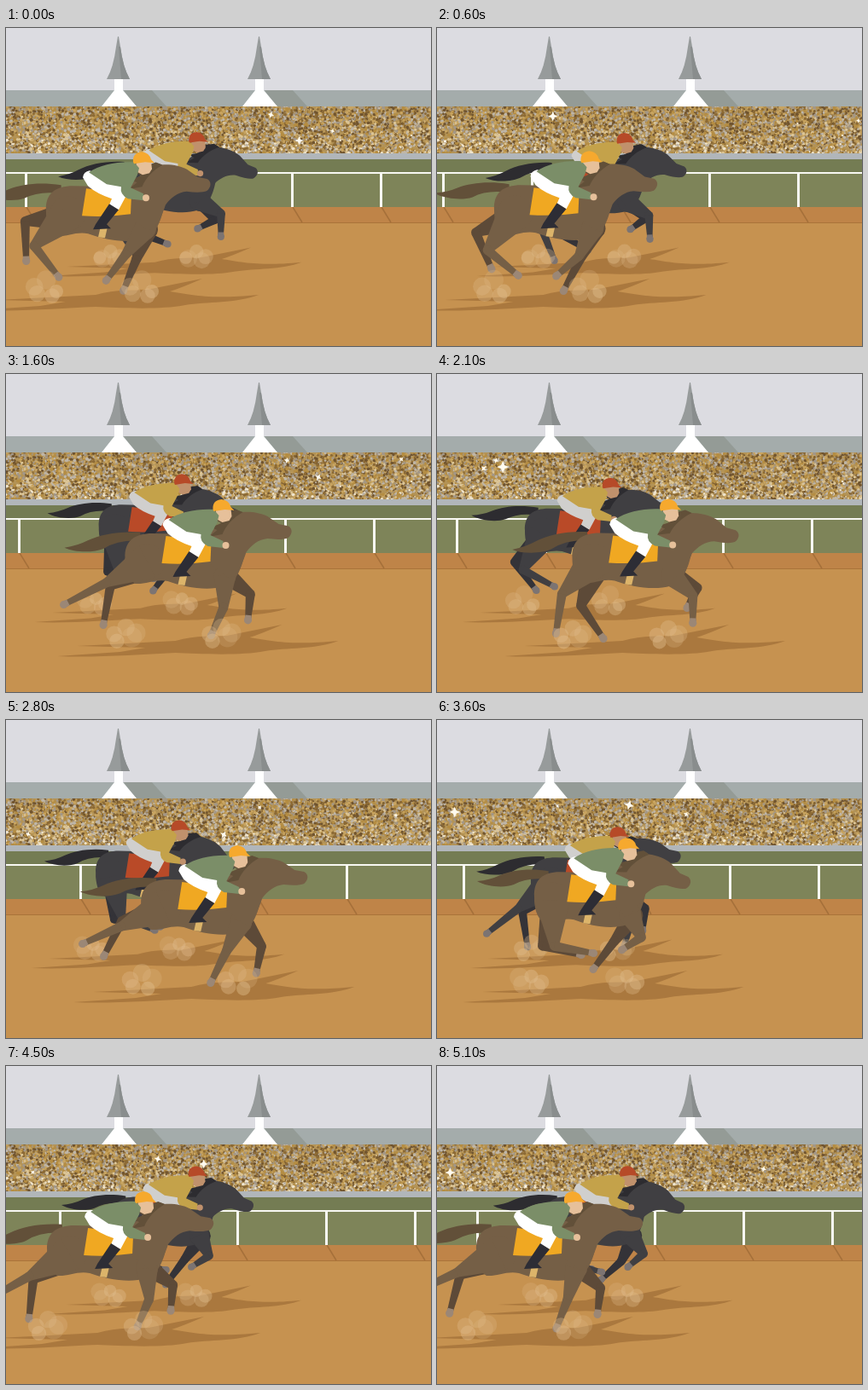
Recreate the animation shown at these times as an HTML page with a canvas. Size 498 px wide and 373 px high, loop 5200 ms.

```html
<!DOCTYPE html>
<html lang="en">
<head>
<meta charset="utf-8">
<title>Horse race</title>
<style>
html, body { margin: 0; width: 100%; height: 100%; overflow: hidden; background: #c69250; }
canvas { display: block; width: 498px; height: 373px; }
</style>
</head>
<body>
<canvas id="stage" width="498" height="373"></canvas>
<script>
const W = 498, H = 373, LOOP = 5200, STRIDES = 9;
const ctx = document.getElementById('stage').getContext('2d');

function seeded(s) {
  return () => {
    s = (s + 0x6D2B79F5) | 0;
    let r = Math.imul(s ^ (s >>> 15), 1 | s);
    r = (r + Math.imul(r ^ (r >>> 7), 61 | r)) ^ r;
    return ((r ^ (r >>> 14)) >>> 0) / 4294967296;
  };
}

function rect(c, color, x, y, w, h) {
  c.fillStyle = color;
  c.fillRect(x, y, w, h);
}

function shape(c, color, d) {
  c.fillStyle = color;
  c.fill(new Path2D(d));
}

function disc(c, color, x, y, r) {
  c.fillStyle = color;
  c.beginPath();
  c.arc(x, y, r, 0, 7);
  c.fill();
}

function placed(x, y, paint, c = ctx) {
  c.save();
  c.translate(x, y);
  paint();
  c.restore();
}

// Static scenery, painted once
function paintScenery() {
  const cv = document.createElement('canvas');
  cv.width = W;
  cv.height = H;
  const c = cv.getContext('2d');
  rect(c, '#dcdce1', 0, 0, W, 73);
  rect(c, '#a4acab', 0, 73, W, 19);
  for (const x of [132, 297]) placed(x, 0, () => {
    shape(c, '#949b96', 'M6 73H39L56 92H20Z');
    shape(c, '#fff', 'M-5 59H5V73L21 92H-20L-5 73Z');
    shape(c, '#979b9b', 'M-1 10H0L2 22Q5 46 13 60H-14Q-6 46 -3 22Z');
    shape(c, '#898d8d', 'M0 22H2Q5 46 13 60H3Z');
  }, c);
  crowd(c);
  rect(c, '#b1b6ba', 0, 147, W, 7);
  rect(c, '#747c53', 0, 154, W, 16);
  rect(c, '#7e8459', 0, 170, W, 40);
  rect(c, '#bf8448', 0, 210, W, 18);
  rect(c, '#aa7339', 0, 228, W, 1);
  rect(c, '#c69250', 0, 229, W, H);
  return cv;
}

function crowd(c) {
  const rnd = seeded(11);
  const tones = ['#70542f', '#8c6a35', '#b58d42', '#a39787', '#c9a561', '#bfb6a8', '#dcc596', '#efe4cc'];
  c.save();
  c.beginPath();
  c.rect(0, 92, W, 55);
  c.clip();
  rect(c, '#b39357', 0, 92, W, 55);
  for (let i = 0; i < 7000; i++) {
    const depth = rnd();
    const tone = tones[Math.floor(rnd() * (5.5 + depth * 2.5))];
    disc(c, tone, rnd() * W, 92 + depth * 55, 1 + rnd() * 0.9);
  }
  c.restore();
}

function fence(t) {
  ctx.strokeStyle = '#a5703a';
  ctx.lineWidth = 1.5;
  for (let x = 24 - t * 0.2 % 104; x < W; x += 104) {
    ctx.beginPath();
    ctx.moveTo(x, 210);
    ctx.lineTo(x + 11, 228);
    ctx.stroke();
    rect(ctx, '#f8f8f2', x - 2, 170, 3, 40);
  }
  rect(ctx, '#f8f8f2', 0, 169, W, 2);
}

// Camera flashes spread evenly over the loop
function sparkle(t) {
  const rnd = seeded(5), count = 70;
  for (let i = 0; i < count; i++) {
    const x = rnd() * W, y = 98 + rnd() * 44, size = 4 + rnd() * 4;
    const gap = Math.abs((t - i * LOOP / count + LOOP * 1.5) % LOOP - LOOP / 2);
    if (gap > 150) continue;
    const r = size * (1 - gap / 200), q = r * 0.3;
    placed(x, y, () => {
      ctx.rotate(i % 4 * 0.25);
      shape(ctx, '#fffbf0', `M0 ${-r}L${q} ${-q} ${r} 0 ${q} ${q} 0 ${r} ${-q} ${q} ${-r} 0 ${-q} ${-q}Z`);
    });
  }
}

// Hoof paths: evenly timed points of one stride
const hindPath = [[60, 290], [105, 272], [124, 282], [72, 308], [2, 292], [-23, 261]];
const forePath = [[119, 294], [145, 271], [172, 269], [192, 279], [178, 296], [131, 306]];

// Closed Catmull-Rom curve
function along(path, f) {
  const n = path.length, s = (f + 1) % 1 * n, i = Math.floor(s), u = s - i;
  return [0, 1].map(k => {
    const [a, b, c, d] = [-1, 0, 1, 2].map(j => path[(i + j + n) % n][k]);
    return b + u * (c - a + u * (2 * a - 5 * b + 4 * c - d + u * (3 * (b - c) + d - a))) / 2;
  });
}

function taper(color, ax, ay, wa, bx, by, wb) {
  const len = Math.hypot(bx - ax, by - ay) || 1;
  const nx = (ay - by) / len / 2, ny = (bx - ax) / len / 2;
  shape(ctx, color, `M${ax + nx * wa} ${ay + ny * wa}L${bx + nx * wb} ${by + ny * wb} ${bx - nx * wb} ${by - ny * wb} ${ax - nx * wa} ${ay - ny * wa}Z`);
  disc(ctx, color, bx, by, wb / 2);
}

// Two bones from body to hoof; the sign of bend picks the side of the joint
function leg(color, hoof, [x, y], hx, hy, width, upper, lower, bend) {
  const d = Math.hypot(x - hx, y - hy), dx = (x - hx) / d, dy = (y - hy) / d;
  const a = Math.min(upper, (d * d + upper * upper - lower * lower) / (2 * d));
  const h = bend * Math.sqrt(upper * upper - a * a);
  const jx = hx + dx * a + dy * h, jy = hy + dy * a - dx * h;
  const len = Math.hypot(x - jx, y - jy) || 1;
  const ux = (x - jx) / len * 3, uy = (y - jy) / len * 3;
  disc(ctx, color, hx, hy, width / 2);
  taper(color, hx, hy, width, jx, jy, 11);
  taper(color, jx, jy, 11, x, y, 7);
  taper(hoof, x - ux, y - uy, 7, x + ux, y + uy, 9);
}

function hindLeg(color, hoof, at, x, y, width) {
  leg(color, hoof, at, x, y, width, 54, 44, -1);
}

function foreLeg(color, hoof, at, x, y, width) {
  leg(color, hoof, at, x, y, width, 38, 34, 0.6);
}

function shadow() {
  shape(ctx, 'rgba(132,84,36,.42)', 'M-33 331L40 326 70 321 -10 319 30 317 105 313C130 306 150 308 165 307L230 294Q205 305 192 309C215 312 235 319 296 313C270 323 235 321 210 325C180 331 130 328 105 327C60 329 10 333 -33 331Z');
}

function dust(f) {
  for (const x of [46, 158])
    for (let i = 0; i < 5; i++) {
      const age = (f + i * 0.4) % 1, a = i * 2.4;
      disc(ctx, `rgba(224,188,140,${0.45 - age * 0.25})`,
        x + 13 * Math.cos(a), 309 + 8 * Math.sin(a) - age * 7, 8 + 4 * age);
    }
}

function tail(k, f) {
  placed(62, 190, () => {
    ctx.rotate(-0.06 * (1 - Math.cos(2 * Math.PI * (f - 0.1))));
    shape(ctx, k.mane, 'M2 -4C-22 -8 -44 -6 -60 0Q-72 5 -88 6C-76 13 -54 15 -42 11Q-24 2 2 6Z');
  });
}

function head(k, angle) {
  placed(165, 198, () => {
    ctx.rotate(angle);
    ctx.translate(-165, -198);
    shape(ctx, k.coat, 'M138 192C150 184 160 170 174 164L178 160 183 162C194 161 205 163 213 167L226 176 237 178C243 181 242 188 237 192Q230 195 213 193C202 194 194 201 188 209C184 222 178 235 168 240L142 220Z');
    shape(ctx, k.mane, 'M184 162L176 159 160 165 166 168 152 171 159 175 146 180 154 183 144 191 160 188C164 178 172 169 184 162Z');
  });
}

function jockey(k) {
  shape(ctx, k.cloth, 'M94 190L147 197 146 220Q117 224 89 222Z');
  shape(ctx, '#dcb46a', 'M111 234L119 235 116 248 108 247Z');
  shape(ctx, k.pants, 'M90 177Q91 170 98 169L116 176 135 187 140 200 132 215 121 209 124 202Q106 196 96 187Z');
  shape(ctx, '#2d2d35', 'M121 208L132 215 118 232 123 237 102 238 105 232Z');
  shape(ctx, k.skin, 'M153 158H170L171 167 168 172 160 174 151 169Z');
  shape(ctx, k.silk, 'M97 171C110 162 130 158 150 159L156 166 154 174 146 189 161 196 161 204 143 202Q133 197 135 188L118 185Z');
  disc(ctx, k.skin, 164, 201, 4);
  shape(ctx, k.cap, 'M149 159Q148 148 159 147Q168 148 170 156L174 160 163 159 150 161Z');
}

// Smooth bump over the stride, 1 at its peak
const bump = (f, peak) => (0.5 + 0.5 * Math.cos(2 * Math.PI * (f - peak))) ** 2;

function horse(k, f) {
  const lift = bump(f, 0.27), dy = -9 * lift;
  const raised = paint => placed(0, dy, paint);
  const gathered = paint => placed(115, dy, () => {
    ctx.scale(1 - 0.07 * lift, 1);
    ctx.translate(-115, 0);
    paint();
  });
  const [hx, hy] = along(hindPath, f - 0.1);

  shadow();
  hindLeg(k.far, k.hoof, [20 + 0.85 * hx, hy], 76, 222 + dy, 36);
  foreLeg(k.far, k.hoof, along(forePath, f - 0.2), 167, 238 + dy, 22);
  gathered(() => {
    tail(k, f);
    shape(ctx, k.coat, 'M46 216C45 196 57 187 78 187L130 188Q155 180 175 180C190 188 192 200 186 212C182 230 176 244 162 249C142 255 116 250 96 243C82 240 70 247 58 246C48 240 46 228 46 216Z');
  });
  hindLeg(k.coat, k.hoof, along(hindPath, f), 72, 220 + dy, 42);
  foreLeg(k.coat, k.hoof, along(forePath, f), 163, 237 + dy, 26);
  gathered(() => head(k, 0.28 * bump(f, 0.36)));
  raised(() => jockey(k));
  dust(f);
}

const bay = {
  coat: '#755f46', far: '#5d4a38', mane: '#625039', hoof: '#9b8776',
  cloth: '#f0a822', pants: '#ffffff', silk: '#7b8e68', skin: '#e6c09a', cap: '#f6a92e'
};
const black = {
  coat: '#403f42', far: '#343338', mane: '#2d2c30', hoof: '#7c7472',
  cloth: '#b94a28', pants: '#d0cfcd', silk: '#c4a24a', skin: '#c0916c', cap: '#b64a28'
};

const ease = u => 0.5 - 0.5 * Math.cos(Math.PI * Math.min(1, Math.max(0, u)));

const scenery = paintScenery();

function draw(t) {
  const lead = ease(t / 2200) - ease((t - 2700) / 1950);
  const stride = t / LOOP * STRIDES;
  ctx.drawImage(scenery, 0, 0);
  sparkle(t);
  fence(t);
  placed(80 - 20.5 * lead, -7, () => {
    ctx.scale(0.9, 0.9);
    horse(black, (stride + 0.475) % 1);
  });
  placed(113 * lead, 0, () => horse(bay, stride % 1));
}

// Shown in 100 ms steps of a 25 fps drawing
const begin = performance.now();
let shown = -1;
function tick() {
  const step = Math.floor((performance.now() - begin) % LOOP / 100);
  if (step !== shown) {
    shown = step;
    draw(Math.floor(step * 100 / 40) * 40);
  }
  requestAnimationFrame(tick);
}
tick();
</script>
</body>
</html>
```
